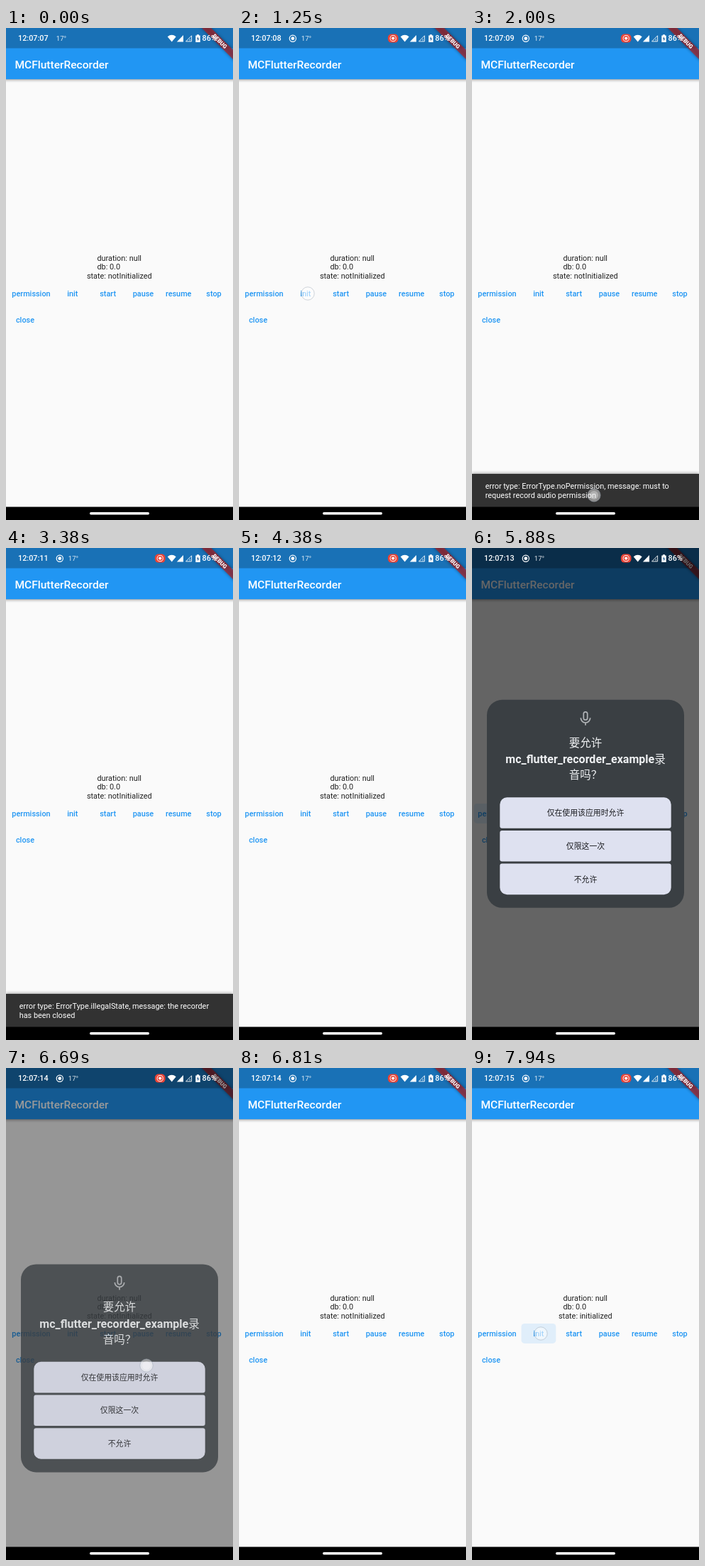
Recreate the animation shown at these times as an HTML page. Size 320 by 693 pixels, loop 8000 ms.

```html
<!DOCTYPE html>
<html lang="zh-CN">
<head>
<meta charset="utf-8">
<title>Recorder demo</title>
<style>
html, body { margin: 0; width: 100%; height: 100%; overflow: hidden; background: #fafafa; }
svg { display: block; width: 100vw; height: 100vh; }
text { font-family: Roboto, "Noto Sans CJK SC", "Noto Sans CJK", sans-serif; font-size: 10.89px; }
.mid { text-anchor: middle; }
.medium { font-weight: 500; }
</style>
</head>
<body>
<svg viewBox="0 0 320 693">
  <defs>
    <linearGradient id="shade" x1="0" y1="0" x2="0" y2="1">
      <stop offset="0" stop-color="#000" stop-opacity=".32"/>
      <stop offset=".4" stop-color="#000" stop-opacity=".12"/>
      <stop offset="1" stop-color="#000" stop-opacity="0"/>
    </linearGradient>
    <filter id="blur" x="-20%" y="-60%" width="140%" height="220%"><feGaussianBlur stdDeviation="2"/></filter>
  </defs>

  <rect width="320" height="693" fill="#fafafa"/>
  <rect y="72" width="320" height="5" fill="url(#shade)"/>
  <rect width="320" height="72.1" fill="#2196f3"/>
  <rect width="320" height="28.5" fill="#000" opacity=".25"/>
  <text class="medium" x="12.45" y="56.5" fill="#fff" style="font-size:15.56px">MCFlutterRecorder</text>

  <g fill="#212121">
    <text x="128.4" y="327.8">duration: null</text>
    <text x="128.4" y="340.4">db: 0.0</text>
    <text id="state" class="mid" x="159.8" y="352.8"></text>
  </g>
  <g id="buttons" fill="#2196f3"></g>

  <g id="snack">
    <rect y="627" width="320" height="50" fill="#000" opacity=".35" filter="url(#blur)"/>
    <rect y="628" width="320" height="66" fill="#323232"/>
    <g id="message" fill="#fff">
      <text x="18.7" y="648.9"></text>
      <text x="18.7" y="661.6"></text>
    </g>
  </g>

  <g transform="translate(320 0) rotate(45)">
    <rect x="-42" y="21.8" width="84" height="9.3" fill="#000" opacity=".4" filter="url(#blur)"/>
    <rect x="-42" y="21.8" width="84" height="9.3" fill="#b71c1c" opacity=".65"/>
    <text class="mid" y="29.2" fill="#fff" style="font-size:7.93px;font-weight:900">DEBUG</text>
  </g>

  <rect id="dim" width="320" height="693" fill="#000"/>

  <g id="dialog">
    <rect x="21" y="214" width="278" height="293" rx="21.5" fill="#3a3f43"/>
    <g fill="none" stroke="#b0b3b6" stroke-width="1.7">
      <rect x="157.3" y="231" width="5.4" height="11.4" rx="2.7"/>
      <path d="M153.3 239.5a6.7 6.7 0 0 0 13.4 0M160 246.2v3.8"/>
    </g>
    <g class="mid" fill="#eef0f2">
      <text x="160" y="279.8" style="font-size:15.5px">要允许</text>
      <text x="160" y="303.2" style="font-size:15.5px"><tspan style="font-size:16px;font-weight:700">mc_flutter_recorder_example</tspan>录</text>
      <text x="160" y="325.6" style="font-size:15.5px">音吗？</text>
    </g>
    <g id="choices" class="mid"></g>
  </g>

  <rect y="674.5" width="320" height="18.5" fill="#000"/>
  <rect x="118" y="682" width="84" height="3.4" rx="1.7" fill="#fff"/>

  <g fill="#fff">
    <text id="clock" class="medium" x="17" y="18.4" style="font-size:10.8px"></text>
    <g id="cast" fill="none" stroke="#fff" stroke-width="1.2">
      <circle r="4.6"/>
      <circle r="2.4" fill="#fff" stroke="none"/>
    </g>
    <text id="temp" y="18" opacity=".85" style="font-size:9.6px">17°</text>
    <g id="chip">
      <rect x="-7.3" y="-6" width="14.6" height="12" rx="5" fill="#ea4335"/>
      <circle r="4.1" fill="none" stroke="#fff" stroke-width="1"/>
      <circle r="2.1"/>
    </g>
    <path d="M233.7 19.6L227.7 12.2Q233.7 7.4 239.7 12.2Z"/>
    <path d="M240.8 19.4H250V10Z"/>
    <path d="M253.6 18.9H261.6V10.8Z" fill="none" stroke="#fff" stroke-width=".9"/>
    <path d="M259.2 15.4v1.6M259.2 17.6v.9" stroke="#fff" stroke-width="1"/>
    <path d="M269 9.2h3v1.2h1.7v9.6h-6.4v-9.6h1.7z"/>
    <path d="M270.9 12l-2 3.6h1.4v3l2-3.8h-1.4z" fill="#245f95"/>
    <text class="medium" x="276.6" y="18.4" style="font-size:10.8px">86%</text>
  </g>

  <g id="touch">
    <circle r="9.2" fill="#fff" fill-opacity=".45" stroke="#8c9aa8" stroke-opacity=".4" stroke-width="1"/>
    <circle r="6" fill="#fff" fill-opacity=".3"/>
  </g>
</svg>
<script>
const LOOP = 8000;
const $ = id => document.getElementById(id);
const clamp = x => Math.max(0, Math.min(1, x));
const span = (t, start, length) => clamp((t - start) / length);
const easeOut = (p, n = 3) => 1 - (1 - p) ** n;
const easeInOut = p => p * p * (3 - 2 * p);
const fade = (el, value) => el.setAttribute('opacity', value.toFixed(3));
const place = (el, x, y, scale = 1) =>
  el.setAttribute('transform', `translate(${x.toFixed(2)} ${y.toFixed(2)}) scale(${scale.toFixed(3)})`);
const setText = (el, value) => { if (el.textContent !== value) el.textContent = value; };

// Action buttons: minimum width 49.8, the first one is wider
const CELL = 49.8, LEFT = 2.1, FIRST = 66.8;
const names = ['permission', 'init', 'start', 'pause', 'resume', 'stop', 'close'];
const buttons = names.map((name, i) => {
  const last = i === 6;
  const w = i ? CELL : FIRST;
  const x = i === 0 || last ? LEFT : LEFT + FIRST + (i - 1) * CELL;
  return { name, x, w, y: last ? 411.2 : 373.9 };
});
$('buttons').innerHTML = buttons.map(b => `
  <rect x="${b.x + .6}" y="${b.y - 14}" width="${b.w - 1}" height="28" rx="4.5" opacity="0"/>
  <text class="mid medium" x="${b.x + b.w / 2}" y="${b.y + 3.7}">${b.name}</text>`).join('');
const inks = $('buttons').querySelectorAll('rect');

// Dialog choices: the outer corners are rounder
function choiceShape(y, top, bottom) {
  const h = 43.6 - top - bottom;
  return `M39.3 ${y + top}a${top} ${top} 0 0 1 ${top} ${-top}h${241.4 - 2 * top}a${top} ${top} 0 0 1 ${top} ${top}` +
    `v${h}a${bottom} ${bottom} 0 0 1 ${-bottom} ${bottom}h${2 * bottom - 241.4}a${bottom} ${bottom} 0 0 1 ${-bottom} ${-bottom}z`;
}
$('choices').innerHTML = ['仅在使用该应用时允许', '仅限这一次', '不允许'].map((label, i) => {
  const y = 351.4 + i * 46.7;
  return `<path d="${choiceShape(y, i ? 3 : 10, i < 2 ? 3 : 10)}" fill="#dee1f0"/>
    <text x="160" y="${y + 26}" fill="#1b1c20">${label}</text>`;
}).join('');
const chosen = $('choices').querySelectorAll('path')[1];

const touches = [
  { from: 1250, to: 1400, x: 97, y: 374 },
  { from: 2000, to: 2190, x: 172, y: 658, drag: 25 },
  { from: 2940, to: 3090, x: 144, y: 374 },
  { from: 4060, to: 4250, x: 172, y: 658, drag: 27 },
  { from: 5560, to: 5700, x: 36, y: 373 },
  { from: 6500, to: 6730, x: 198, y: 419 },
  { from: 7810, to: 8000, x: 97, y: 374 }
];
const presses = [
  { button: 1, from: 1280, to: 1450 },
  { button: 2, from: 2970, to: 3140 },
  { button: 0, from: 5600, to: 5930 },
  { button: 1, from: 7840, to: 8000 }
];
const snacks = [
  { show: 1370, hide: 2040, lines: ['error type: ErrorType.noPermission, message: must to', 'request record audio permission'] },
  { show: 3070, hide: 4100, lines: ['error type: ErrorType.illegalState, message: the recorder', 'has been closed'] }
];

function drawStatus(t) {
  const second = 7 + Math.floor((t + 690) / 1000);
  setText($('clock'), '12:07:' + String(second).padStart(2, '0'));
  const p = easeInOut(span(t, 70, 430));
  $('temp').setAttribute('x', 70.8 + 17 * p);
  place($('cast'), 75.8, 14.7, .4 + .6 * p);
  fade($('cast'), p);
  place($('chip'), 217.2, 14.6, p);
  fade($('chip'), p);
}

function drawButtons(t) {
  inks.forEach((ink, i) => {
    let alpha = 0;
    for (const p of presses) {
      if (p.button === i) alpha += span(t, p.from, 60) * (1 - span(t, p.to, 150));
    }
    fade(ink, .12 * alpha);
  });
  setText($('state'), t < 7900 ? 'state: notInitialized' : 'state: initialized');
}

function drawSnack(t) {
  const snack = snacks.find(s => t >= s.show && t < s.hide + 200);
  $('snack').style.display = snack ? '' : 'none';
  if (!snack) return;
  const shown = span(t, snack.show, 250);
  const drop = 50 * (1 - easeOut(shown)) + 52 * easeInOut(span(t, snack.hide, 200));
  place($('snack'), 0, drop);
  fade($('message'), span(shown, .4, .5));
  snack.lines.forEach((line, i) => setText($('message').children[i], line));
}

function drawDialog(t) {
  const open = t >= 5700 && t < 6800;
  $('dialog').style.display = $('dim').style.display = open ? '' : 'none';
  if (!open) return;
  const enter = span(t, 5700, 400);
  const leave = span(t, 6600, 200);
  place($('dialog'), 0, -8 + 87 * (1 - enter) ** 4 + 340 * leave ** 2);
  fade($('dialog'), clamp(enter / .4) * (1 - leave ** 2));
  fade($('dim'), .6 * clamp(enter / .45) * (1 - leave ** 1.4));
  chosen.setAttribute('fill', t > 6500 && t < 6620 ? '#cfd2e1' : '#dee1f0');
}

function drawTouch(t) {
  const touch = touches.find(s => t >= s.from && t < s.to);
  $('touch').style.display = touch ? '' : 'none';
  if (!touch) return;
  const moved = (touch.drag || 0) * easeInOut(span(t, touch.from + 40, 120));
  place($('touch'), touch.x, touch.y + moved);
}

function draw(t) {
  drawStatus(t);
  drawButtons(t);
  drawSnack(t);
  drawDialog(t);
  drawTouch(t);
}

const begin = performance.now();
function tick() {
  draw((performance.now() - begin) % LOOP);
  requestAnimationFrame(tick);
}
draw(0);
requestAnimationFrame(tick);
</script>
</body>
</html>
```
